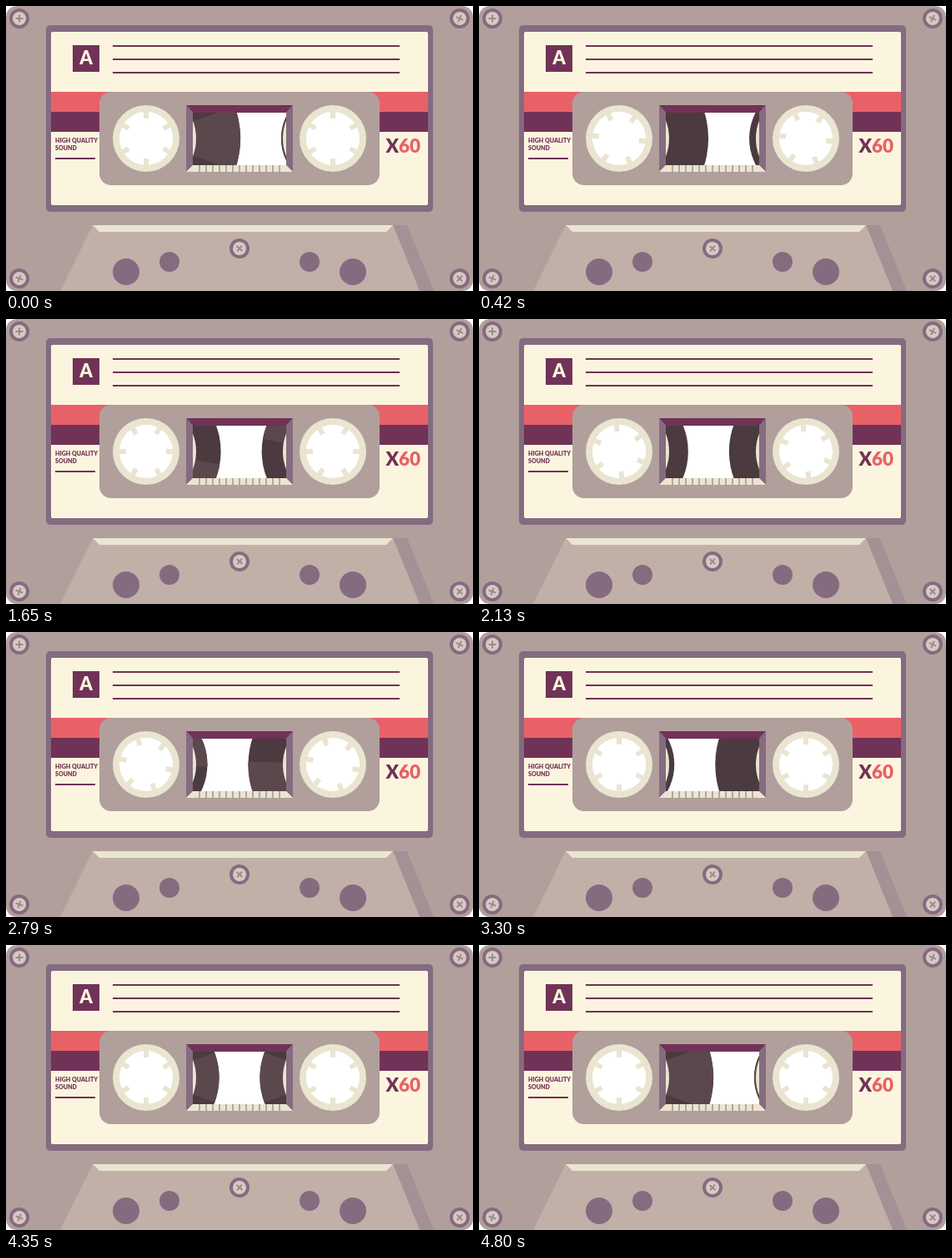
These frames come from a looping animation (560 by 342 pixels, 5100 ms). An HTML page:

```html
<!DOCTYPE html>
<html lang="en">
<head>
<meta charset="utf-8">
<title>Cassette</title>
<style>
  html, body { margin: 0; width: 100%; height: 100%; overflow: hidden; background: #fff; }
  svg { display: block; width: 560px; height: 342px; }
  text { font-family: Lato, sans-serif; font-weight: 900; }
  .body { fill: #b19f9c; }
  .mauve { fill: #856b80; }
  .plum { fill: #713257; }
  .red { fill: #e86167; }
  .paper { fill: #fbf5df; }
  .cream { fill: #eae5d0; }
  .dark { fill: #4b3a3f; }
  .light { fill: #5a484c; }
</style>
</head>
<body>
<svg viewBox="0 0 560 342">
  <defs>
    <clipPath id="pane"><rect x="224" y="127.5" width="112" height="63.5"/></clipPath>
    <g id="screw">
      <circle class="mauve" r="12"/>
      <circle r="8" fill="#d5cac3"/>
      <path d="M-4.5 0H4.5M0 -4.5V4.5" stroke="#9c8a8a" stroke-width="2"/>
    </g>
  </defs>

  <rect class="body" width="560" height="342" rx="13"/>

  <path fill="#a49196" d="M464 263H481L513 342H496Z"/>
  <path fill="#c1b0a8" d="M104 263H464L496 342H65Z"/>
  <path class="cream" d="M104 263H464L456 271H112Z"/>
  <g class="mauve">
    <circle cx="144" cy="319" r="16"/>
    <circle cx="196" cy="307" r="12"/>
    <circle cx="364" cy="307" r="12"/>
    <circle cx="416" cy="319" r="16"/>
  </g>

  <use href="#screw" transform="translate(16 15)"/>
  <use href="#screw" transform="translate(544 15) rotate(25)"/>
  <use href="#screw" transform="translate(16 327) rotate(20)"/>
  <use href="#screw" transform="translate(544 327) rotate(45)"/>
  <use href="#screw" transform="translate(280 291) rotate(40)"/>

  <rect class="mauve" x="48" y="23" width="464" height="224" rx="5"/>
  <rect class="paper" x="54" y="31" width="452" height="208" rx="2"/>
  <rect class="red" x="54" y="103" width="452" height="24"/>
  <rect class="plum" x="54" y="127" width="452" height="24"/>
  <g class="plum">
    <rect x="80" y="47" width="32" height="32"/>
    <rect x="128" y="47" width="344" height="2"/>
    <rect x="128" y="63" width="344" height="2"/>
    <rect x="128" y="79" width="344" height="2"/>
    <rect x="59" y="182" width="48" height="2"/>
    <text x="59" y="164" font-size="7.1">HIGH QUALITY</text>
    <text x="59" y="173" font-size="7.1">SOUND</text>
  </g>
  <text class="paper" x="96" y="70" font-size="22" text-anchor="middle">A</text>
  <text class="plum" x="455.5" y="176" font-size="22.5">X<tspan class="red">60</tspan></text>

  <rect class="body" x="112" y="103" width="336" height="112" rx="14"/>

  <rect x="224" y="127" width="112" height="64" fill="#fff"/>
  <g id="tapes" clip-path="url(#pane)"></g>
  <path class="plum" d="M216 119H344L336 128H224Z"/>
  <path class="mauve" d="M216 119L224 128V191L216 199ZM344 119L336 128V191L344 199Z"/>
  <path class="cream" d="M216 199L224 191H336L344 199Z"/>
  <path d="M231 195H330" stroke="#b5a8a0" stroke-width="8" stroke-dasharray="2 6"/>

  <g id="wheels"></g>
</svg>
<script>
  const NS = "http://www.w3.org/2000/svg";
  const LOOP = 5100, STEP = 30;
  const PLAY_END = 3600, REWIND_START = 3900, REWIND_END = 4800;
  const R_MIN = 62, R_MAX = 113, HUB = 60, TURN = 720;

  function add(parent, tag, attrs) {
    const el = document.createElementNS(NS, tag);
    for (const k in attrs) el.setAttribute(k, attrs[k]);
    return parent.appendChild(el);
  }

  // Two opposite wedges, 40 degrees wide, reaching out to radius r
  function wedges(r) {
    const a = 20 * Math.PI / 180;
    const x = r * Math.cos(a), y = r * Math.sin(a);
    return `M0 0L${x} ${-y}A${r} ${r} 0 0 1 ${x} ${y}Z` +
           `M0 0L${-x} ${y}A${r} ${r} 0 0 1 ${-x} ${-y}Z`;
  }

  function makeReel(cx) {
    const at = { transform: `translate(${cx} 159)` };
    const tape = add(document.getElementById("tapes"), "g", at);
    const disc = add(tape, "circle", { class: "dark" });
    const shine = add(tape, "path", { class: "light" });
    add(tape, "circle", { class: "cream", r: HUB });

    const wheel = add(document.getElementById("wheels"), "g", at);
    add(wheel, "circle", { class: "cream", r: 40 });
    add(wheel, "circle", { fill: "#fff", r: 32 });
    const teeth = add(wheel, "g", {});
    for (let i = 0; i < 6; i++) {
      add(teeth, "rect", {
        class: "cream", x: -3, y: -33, width: 6, height: 9,
        transform: `rotate(${i * 60})`
      });
    }

    return (r, angle) => {
      const spin = `rotate(${angle})`;
      disc.setAttribute("r", r);
      shine.setAttribute("d", wedges(r));
      shine.setAttribute("transform", spin);
      teeth.setAttribute("transform", spin);
    };
  }

  const left = makeReel(168), right = makeReel(392);

  // Share of the tape wound onto the right reel
  function progress(t) {
    if (t < PLAY_END) return t / PLAY_END;
    if (t < REWIND_START) return 1;
    if (t < REWIND_END) return (REWIND_END - t) / (REWIND_END - REWIND_START);
    return 0;
  }

  function draw(ms) {
    const t = Math.floor((ms % LOOP) / STEP) * STEP;
    const p = progress(t);
    const wound = (R_MAX - R_MIN) * p;
    left(R_MAX - wound, -TURN * p);
    right(R_MIN + wound, -TURN * p);
  }

  const start = performance.now();
  function tick() {
    draw(performance.now() - start);
    requestAnimationFrame(tick);
  }
  draw(0);
  requestAnimationFrame(tick);
</script>
</body>
</html>
```
